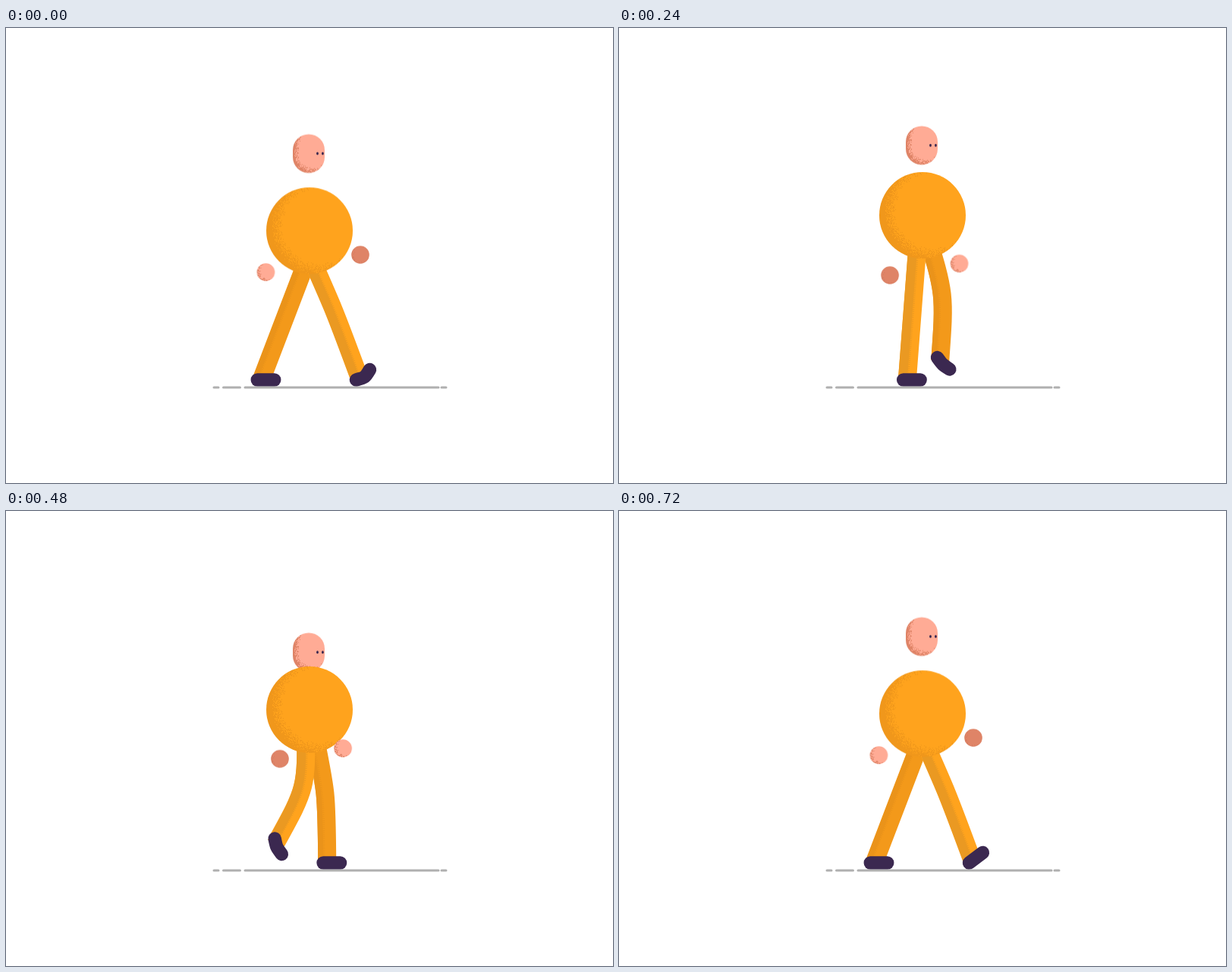
Write an HTML page with a canvas that moves like this. It is 800 by 600 pixels and loops after 750 ms.

```html
<!DOCTYPE html>
<html lang="en">
<head>
<meta charset="utf-8">
<title>Walk cycle</title>
<style>
  html, body { margin: 0; width: 100%; height: 100%; overflow: hidden; background: #fff; }
  canvas { display: block; }
</style>
</head>
<body>
<canvas id="stage" width="800" height="600"></canvas>
<script>
const ctx = document.getElementById('stage').getContext('2d');
const FRAME = 30, FRAMES = 25, CYCLE = 24, STEP = CYCLE / 2;
const FLOOR = 464, HALF_FOOT = 11.2, LEG_LENGTH = 188;
const SKIN = '#ffab95', SKIN_SHADE = '#df8467', ORANGE = '#ffa31d', SHOE = '#3b2850';

let seed = 7;
const random = () => (seed = (seed * 16807) % 2147483647) / 2147483647;
const { sin, cos, min, max, hypot, PI } = Math;
const smooth = u => u * u * (3 - 2 * u);
const sharp = u => u < .5 ? 4 * u ** 3 : 1 - 4 * (1 - u) ** 3;

// Height of something that falls and is thrown back up once per step
function bounce(t, apex, top, fall, rise) {
  const u = (t - apex + CYCLE) % STEP;
  return top + min(fall * u ** 2, rise * (STEP - u) ** 2);
}

// Swings forth and back along a shallow arc
function hand(t) {
  const s = sharp(max(0, min(t, CYCLE - .3 - t)) / STEP), r = 1 - s;
  return [342.5 + 124.5 * s, r * r * 322 + 2 * r * s * 343 + s * s * 299];
}

// Centre, tilt and sole bend: planted for one step, then swung forward
function foot(t, side) {
  let x, y = FLOOR, tilt, bend;
  if (t <= STEP) {
    const landing = max(0, 1 - t / 2);
    x = 472.7 - 10.85 * t;
    tilt = -.645 * landing;
    bend = 3.5 * landing;
  } else {
    const u = (t - STEP) / STEP;
    x = 342.5 + 130.2 * smooth(u ** 1.3) + side * 3 * sin(PI * u);
    y -= 29 * sin(PI * u) ** 2;
    tilt = 1.22 * sin(3.7 * u);
    bend = 2 * (1 - u ** 4);
  }
  const toeUp = min(tilt, 0);   // the heel stays down while the toe is up
  return { x: x - HALF_FOOT * (1 - cos(toeUp)), y: y + HALF_FOOT * sin(toeUp), tilt, bend };
}

// Upright capsule with a grainy shadow on its lower left side
function grainy(r, half, base, shade, dx, dy, inset, soft) {
  const c = document.createElement('canvas'), g = c.getContext('2d');
  const w = c.width = 2 * Math.ceil(r) + 4, h = c.height = w + 2 * Math.ceil(half);
  g.fillStyle = base;
  g.beginPath();
  g.roundRect(w / 2 - r, h / 2 - r - half, 2 * r, 2 * (r + half), r);
  g.fill();
  g.globalCompositeOperation = 'source-atop';
  g.fillStyle = shade;
  for (let y = 0; y < h; y++) for (let x = 0; x < w; x++) {
    const px = x + .5 - w / 2 - dx, py = y + .5 - h / 2 - dy;
    const dist = hypot(px, max(Math.abs(py) - half, 0));
    if (random() < (dist - r + inset) / soft) g.fillRect(x, y, 1, 1);
  }
  return c;
}
const body = grainy(57, 0, ORANGE, '#f0971b', 14, -6, 8, 16);
const head = grainy(21, 4.6, SKIN, SKIN_SHADE, 6, -4, 3, 8);
const nearHand = grainy(11.8, 0, SKIN, SKIN_SHADE, 4, -2, 1, 6);
const farHand = grainy(11.8, 0, SKIN_SHADE, '#d67c60', 4, -2, 1, 8);

const place = (sprite, x, y) => ctx.drawImage(sprite, x - sprite.width / 2, y - sprite.height / 2);

// Limb from one point to another whose middle is pushed sideways by `sag`
function limb(x1, y1, x2, y2, sag, width, color, shift = 0) {
  const k = 4 / 3 * sag / hypot(x2 - x1, y2 - y1);
  const cx = (x1 + x2) / 2 - k * (y2 - y1) + shift, cy = (y1 + y2) / 2 + k * (x2 - x1);
  ctx.lineWidth = width;
  ctx.strokeStyle = color;
  ctx.beginPath();
  ctx.moveTo(x1 + shift, y1);
  ctx.bezierCurveTo(cx, cy, cx, cy, x2 + shift, y2);
  ctx.stroke();
}

function leg(t, hipX, hipY, side, base, shade, shadeWidth) {
  const { x, y, tilt, bend } = foot(t, side);
  const dx = HALF_FOOT * cos(tilt), dy = HALF_FOOT * sin(tilt);
  const ankleX = x - .54 * dx, ankleY = y - .54 * dy;
  // The knee gives way as far as the hip comes closer to the ankle
  const slack = LEG_LENGTH ** 2 - (ankleX - hipX) ** 2 - (ankleY - hipY) ** 2;
  const line = [hipX, hipY, ankleX, ankleY, -.16 * Math.sqrt(max(0, slack))];
  ctx.lineCap = 'butt';
  limb(...line, 24, base);
  limb(...line, shadeWidth, shade, shadeWidth / 2 - 12);
  ctx.setLineDash([1, 1.6]);
  limb(...line, 2.5, shade, shadeWidth - 11);
  ctx.setLineDash([]);
  ctx.lineCap = 'round';
  limb(x - dx, y - dy, x + dx, y + dy, bend, 17.5, SHOE);
}

function ground() {
  ctx.lineWidth = 3;
  ctx.strokeStyle = '#b0b0b0';
  ctx.beginPath();
  for (const [from, to] of [[274, 280], [286.5, 308.5], [315, 570], [574, 580]]) {
    ctx.moveTo(from, 474);
    ctx.lineTo(to, 474);
  }
  ctx.stroke();
}

function draw(t) {
  const far = (t + STEP) % CYCLE;
  const bodyY = bounce(t, 7.7, 246.9, 1.1, 1.1), headY = bounce(t, 8.55, 154.3, .95, 1.54);
  ctx.fillStyle = '#fff';
  ctx.fillRect(0, 0, 800, 600);
  place(farHand, ...hand(far));
  leg(far, 404, bodyY + 20, 1, '#f3991a', '#ea931a', 7);
  leg(t, 395, bodyY + 20, -1, ORANGE, '#ea9922', 12);
  ground();
  place(head, 399, headY);
  ctx.fillStyle = SHOE;
  for (const x of [410.5, 417.4]) {
    ctx.beginPath();
    ctx.ellipse(x, headY, 1.4, 2, 0, 0, 2 * PI);
    ctx.fill();
  }
  place(body, 400, bodyY);
  place(nearHand, ...hand(t));
}

const start = performance.now();
function tick() {
  draw(Math.floor((performance.now() - start) / FRAME) % FRAMES);
  requestAnimationFrame(tick);
}
tick();
</script>
</body>
</html>
```
